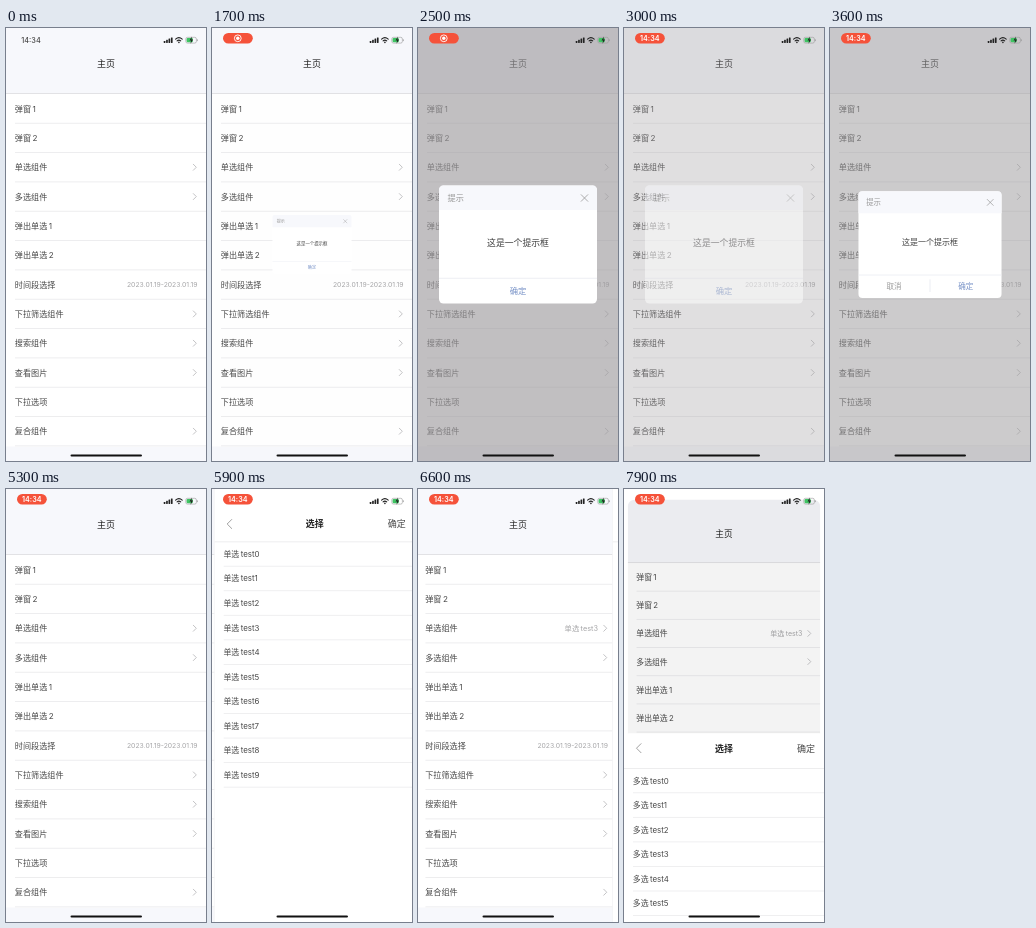
Animation of 200x433 px, one loop 8 s. Source, as an HTML page:

```html
<!DOCTYPE html>
<html lang="zh-CN">
<head>
<meta charset="utf-8">
<title>组件演示</title>
<style>
html, body { margin: 0; width: 100%; height: 100%; overflow: hidden; background: #fff; }
svg { display: block; width: 200px; height: 433px; }
text { font-family: Inter, "Noto Sans CJK SC", "Noto Sans CJK", sans-serif; }
</style>
</head>
<body>
<svg id="stage" viewBox="0 0 200 433"></svg>
<script>
const LOOP = 8000;
const TINT = '#f7f8fc', LINE = '#ebebed', INK = '#484848', MUTED = '#a6a6a8', BLUE = '#7a94c8';
const stage = document.getElementById('stage');

function add(parent, tag, attrs = {}) {
  const el = document.createElementNS('http://www.w3.org/2000/svg', tag);
  set(el, attrs);
  parent.append(el);
  return el;
}
function set(el, attrs) {
  for (const key in attrs) el.setAttribute(key, attrs[key]);
}
const group = parent => add(parent, 'g');
const rect = (parent, x, y, width, height, fill, rx = 0) =>
  add(parent, 'rect', { x, y, width, height, fill, rx });
const stroke = (parent, d, color, width = 0.8) =>
  add(parent, 'path', { d, fill: 'none', stroke: color, 'stroke-width': width, 'stroke-linecap': 'round', 'stroke-linejoin': 'round' });

// y is the middle of the glyphs; a small gap separates Chinese from Latin
function label(parent, str, x, y, size, fill, anchor = 'start', weight = 400) {
  const el = add(parent, 'text', { x, y: y + size * 0.37, 'font-size': size, fill, 'text-anchor': anchor, 'font-weight': weight });
  const [, han, rest] = str.match(/^([\u4e00-\u9fff]*)(.*)$/);
  add(el, 'tspan').textContent = han;
  if (rest) add(el, 'tspan', { dx: han ? 1.4 : 0 }).textContent = rest;
  return el;
}
const next = (parent, y) => stroke(parent, `M187.3 ${y - 3}l3 3-3 3`, '#b4b4b6', 0.8);

function buildHome(g) {
  const card = rect(g, 0, 0, 200, 433, TINT);
  const title = label(g, '主页', 100, 35.2, 9, '#222', 'middle', 500);
  rect(g, 0, 65.5, 200, 353, '#fff');
  rect(g, 0, 65, 200, 1, '#e2e2e5');
  const rows = ['弹窗1', '弹窗2', '单选组件>', '多选组件>', '弹出单选1', '弹出单选2',
    '时间段选择', '下拉筛选组件>', '搜索组件>', '查看图片>', '下拉选项', '复合组件>'];
  rows.forEach((row, i) => {
    const y = 80.6 + i * 29.33;
    label(g, row.replace('>', ''), 8.8, y, 8.15, INK);
    if (row.endsWith('>')) next(g, y);
    rect(g, 9, y + 14.2, 191, 0.9, LINE);
  });
  label(g, '2023.01.19-2023.01.19', 191.5, 256.6, 6.8, MUTED, 'end');
  const choice = label(g, '单选test3', 181.5, 139.3, 7.3, MUTED, 'end');
  const dim = rect(g, 0, 0, 200, 433, '#000');
  return { g, card, title, choice, dim };
}

function buildPicker(g, kind, navY, firstY, count) {
  stroke(g, `M17 ${navY - 4.5}l-4.5 4.5 4.5 4.5`, '#888', 0.8);
  label(g, '选择', 100, navY, 9, '#222', 'middle', 600);
  label(g, '确定', 191, navY, 9, INK, 'end');
  rect(g, 0, firstY - 12.6, 200, 0.9, LINE);
  const names = [];
  for (let i = 0; i < count; i++) {
    const y = firstY + i * 24.55;
    names.push(label(g, `${kind}test${i}`, 8.8, y, 7.9, INK));
    rect(g, 9, y + 11.8, 191, 0.8, LINE);
  }
  return names;
}

function buildDialog(g, cancel) {
  rect(g, 21, 157.6, 158, 118, '#fff', 4.5);
  add(g, 'path', { d: 'M21 182v-19.9q0-4.5 4.5-4.5h149q4.5 0 4.5 4.5v19.9z', fill: TINT });
  label(g, '提示', 29.5, 170.2, 8.2, '#999');
  stroke(g, 'M163.2 166.7l6.6 6.6m0-6.6l-6.6 6.6', '#999', 0.8);
  label(g, '这是一个提示框', 100, 214.3, 8.85, '#404040', 'middle');
  rect(g, 21, 249.8, 158, 0.8, '#e8eaf1');
  if (cancel) {
    label(g, '取消', 60.3, 263, 8.3, '#999', 'middle');
    rect(g, 99.6, 255, 0.8, 14, '#e4e6ee');
  }
  label(g, '确定', cancel ? 139.4 : 100, 263, 8.3, BLUE, 'middle');
}

function buildStatus(g) {
  const clock = label(g, '14:34', 25, 12.2, 7.3, INK, 'middle', 500);
  const pill = group(g);
  rect(pill, 11, 5, 29.8, 10.6, '#f5523a', 5.3);
  const time = label(pill, '14:34', 25.8, 10.3, 7.2, '#fff', 'middle', 600);
  const icon = group(pill);
  add(icon, 'circle', { cx: 25.8, cy: 10.3, r: 3.4, fill: 'none', stroke: '#fff', 'stroke-width': 0.9 });
  add(icon, 'circle', { cx: 25.8, cy: 10.3, r: 1.7, fill: '#fff' });
  for (let i = 0; i < 4; i++) rect(g, 157.7 + i * 2.4, 13 - i * 1.2, 1.7, 2 + i * 1.2, '#222', 0.4);
  stroke(g, 'M169.6 11.2q3.3-3 6.6 0', '#222', 1.1);
  stroke(g, 'M171.1 12.9q1.8-1.5 3.6 0', '#222', 1.1);
  add(g, 'circle', { cx: 172.9, cy: 14.4, r: 0.8, fill: '#222' });
  add(g, 'rect', { x: 179.8, y: 9.3, width: 10.6, height: 5.8, rx: 1.7, fill: 'none', stroke: '#999', 'stroke-width': 0.6 });
  rect(g, 180.6, 10.1, 6.2, 4.2, '#3fc463', 1);
  rect(g, 190.9, 11.2, 0.8, 2, '#999', 0.4);
  add(g, 'path', { d: 'M185.9 8.6l-2.4 4h1.6l-.6 3.2 2.6-4.2h-1.7z', fill: '#222' });
  rect(g, 64.5, 426.4, 71.5, 2.2, '#111', 1.1);
  return { clock, pill, time, icon };
}

const home = buildHome(group(stage));

const page = group(stage);
rect(page, -0.8, 0, 0.8, 433, '#f0f0f2');
rect(page, 0, 0, 200, 433, '#fff');
const options = buildPicker(page, '单选', 35, 65, 10);
const tick = stroke(page, 'M183 138.6l2.4 2.6 4.6-5.2', BLUE, 1);

const sheet = group(stage);
rect(sheet, 0, 0, 200, 440, '#fff', 5);
buildPicker(sheet, '多选', 15, 47.4, 10);

// translucent grey that also washes out the text beneath
const shade = rect(stage, 0, 0, 200, 433, '#9e9b9e');
const dialogs = [
  { open: 1698, close: 2900, cancel: false },
  { open: 3471, close: 4700, cancel: true }
];
for (const d of dialogs) {
  d.g = group(stage);
  buildDialog(d.g, d.cancel);
}
const status = buildStatus(group(stage));

const ramp = (t, start, len) => Math.min(1, Math.max(0, (t - start) / len));
const easeOut = x => 1 - (1 - x) ** 3;
// critically damped spring, rate per second
function spring(t, start, rate) {
  const x = Math.max(0, t - start) * rate / 1000;
  return 1 - (1 + x) * Math.exp(-x);
}
const show = (el, on) => set(el, { display: on ? 'inline' : 'none' });

function render(t) {
  // single choice page
  const pushed = t < 6255 ? spring(t, 5450, 14) : 1 - spring(t, 6255, 16);
  const picked = t >= 6000;
  show(page, pushed > 0.0005);
  set(page, { transform: `translate(${200 * (1 - pushed)} 0)` });
  show(tick, picked);
  set(options[3], { fill: picked ? BLUE : INK });
  show(home.choice, t >= 6255);

  // multiple choice sheet with the home card shrinking behind it
  const risen = spring(t, 7769, 12.1);
  show(sheet, risen > 0);
  set(sheet, { transform: `translate(0 ${433 - 401.5 * risen})` });
  const scale = 1 - 0.083 * risen;
  set(home.g, { transform: `translate(${100 * (1 - scale) - 60 * pushed} ${22.6 * risen}) scale(${scale})` });
  set(home.title, { transform: `translate(${60 * pushed} 0)`, opacity: 1 - pushed });
  const rx = Math.min(7, 16 * risen);
  set(home.card, { rx });
  set(home.dim, { rx, opacity: 0.1 * risen });

  let dark = 0;
  for (const d of dialogs) {
    const grow = easeOut(ramp(t, d.open, 300));
    const alpha = 1 - ramp(t, d.close, 200);
    const on = t >= d.open && alpha > 0;
    show(d.g, on);
    if (!on) continue;
    set(d.g, { transform: `translate(100 216.5) scale(${0.49 + 0.51 * grow}) translate(-100 -216.5)`, opacity: alpha });
    dark = 0.64 * grow * alpha;
  }
  set(shade, { opacity: dark });

  const rec = ramp(t, 100, 300), asIcon = t >= 1000 && t < 3000;
  set(status.clock, { opacity: 1 - rec });
  set(status.pill, { opacity: rec });
  show(status.time, !asIcon);
  show(status.icon, asIcon);
}

let began;
function play(now) {
  began ??= now;
  render((now - began) % LOOP);
  requestAnimationFrame(play);
}
render(0);
requestAnimationFrame(play);
</script>
</body>
</html>
```
